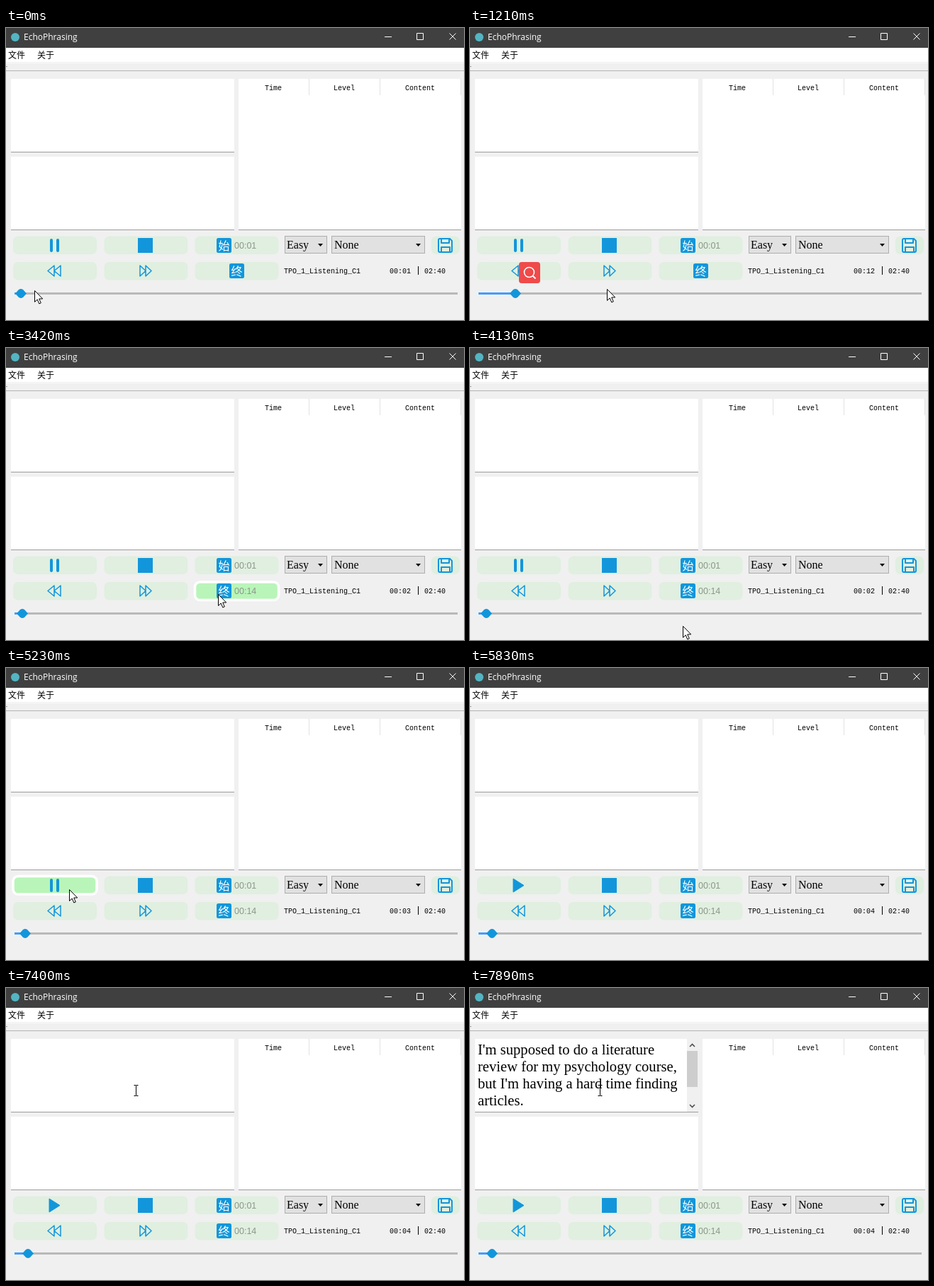
Write an HTML page that moves like this. It is 646 by 413 pixels and loops after 8 s.

```html
<!DOCTYPE html>
<html lang="zh">
<head>
<meta charset="utf-8">
<title>EchoPhrasing</title>
<style>
  html, body { margin: 0; width: 100%; height: 100%; overflow: hidden; background: #f0f0f0; }
  svg { display: block; width: 646px; height: 413px; }
  text { white-space: pre; }
  .title { font: 12px "Open Sans", "Noto Sans", sans-serif; }
  .menu { font: 12px "Noto Sans CJK SC", "Noto Sans CJK", sans-serif; }
  .mono { font: 10px "Liberation Mono", monospace; }
  .combo { font: 16px "Liberation Serif", serif; }
  .script { font: 20.6px "Liberation Serif", serif; }
  .mark { font: 300 16px "Noto Sans CJK SC", "Noto Sans CJK", sans-serif; fill: #fff; text-anchor: middle; }
  .stamp { font: 12.5px "Liberation Sans", sans-serif; fill: #8b978b; }
  .button { fill: #e0efe0; }
  .button.hover { fill: #b9f5b9; stroke: #fff; stroke-width: 3.5; }
  .solid { fill: #1296db; }
  .outline { fill: none; stroke: #1296db; stroke-width: 1.5; stroke-linejoin: round; }
  #bar { fill: #404040; color: #fff; }
  .chrome { fill: none; stroke: #fff; }
  .inactive #bar { fill: #fff; }
  .inactive .chrome { stroke: #858585; }
  .title { fill: #fff; }
  .inactive .title { fill: #999; }
  .inactive .menu { fill: #777; }
</style>
</head>
<body>
<svg id="stage" viewBox="0 0 646 413">
  <rect width="646" height="413" fill="#f0f0f0"/>
  <rect id="bar" width="646" height="28"/>
  <circle cx="13" cy="13" r="6" fill="#52b5c4"/>
  <text class="title" x="25" y="17">EchoPhrasing</text>
  <path class="chrome" d="M534 12.5h10M579.5 7.5h9v9h-9zM625.5 7.5l9 9m0-9l-9 9"/>
  <rect y="28" width="646" height="20" fill="#fff"/>
  <text class="menu" x="3" y="43">文件</text>
  <text class="menu" x="44" y="43">关于</text>
  <path d="M0 49.5h646" stroke="#fafafa"/>
  <path d="M0 60.5h646" stroke="#b4b4b4"/>
  <path d="M0 54.5h2" stroke="#a0a0a0"/>

  <g fill="#fff">
    <rect x="7" y="72" width="315" height="104"/>
    <rect x="7" y="182" width="315" height="104"/>
    <rect x="328" y="72" width="314" height="214"/>
  </g>
  <path d="M7 175.5h315M7 285.5h315M328 285.5h314" stroke="#9c9c9c"/>
  <path d="M427.5 72v23M527.5 72v23M641.5 72v23" stroke="#e2e2e2"/>
  <g class="mono">
    <text x="365" y="88">Time</text>
    <text x="462" y="88">Level</text>
    <text x="563" y="88">Content</text>
    <text x="392" y="347">TPO_1_Listening_C1</text>
    <text id="clock" x="541" y="347"></text>
    <text x="590" y="347">02:40</text>
  </g>
  <path d="M581.5 337v12" stroke="#000"/>

  <g id="transcript">
    <g class="script" id="lines"></g>
    <rect x="306" y="72" width="16" height="103" fill="#f0f0f0"/>
    <rect x="306" y="89" width="15" height="51" fill="#cdcdcd"/>
    <path d="M310 83l3.5-3.5 3.5 3.5M310 165l3.5 3.5 3.5-3.5" fill="none" stroke="#505050" stroke-width="1.6"/>
  </g>

  <g id="buttons"></g>

  <path id="pause" class="solid" d="M64 298h0a2 2 0 0 1 2 2v15a2 2 0 0 1-4 0v-15a2 2 0 0 1 2-2zM73 298h0a2 2 0 0 1 2 2v15a2 2 0 0 1-4 0v-15a2 2 0 0 1 2-2z"/>
  <path id="play" class="solid" d="M61 298L76 307.5 61 317z" stroke="#1296db" stroke-linejoin="round"/>
  <rect class="solid" x="186" y="297" width="21" height="21"/>
  <path class="outline" d="M68 336v15l-9-7.5zM77 336v15l-9-7.5zM189 336v15l8-7.5zM197 336v15l8-7.5z"/>
  <path class="outline" style="stroke-width:2" d="M612 298h14l3 3v14a2 2 0 0 1-2 2h-15a2 2 0 0 1-2-2v-15a2 2 0 0 1 2-2zM614 298v6h11v-6M614 317v-7h12v7"/>

  <g>
    <rect class="solid" x="297" y="297" width="21" height="21" rx="2.5"/>
    <text class="mark" x="307.5" y="313.5">始</text>
    <text class="stamp" x="322" y="312">00:01</text>
  </g>
  <g id="endMark">
    <rect class="solid" x="297" y="333" width="21" height="21" rx="2.5"/>
    <text class="mark" x="307.5" y="349.5">终</text>
  </g>
  <text id="endStamp" class="stamp" x="322" y="348">00:14</text>

  <g fill="#e1e1e1" stroke="#adadad">
    <rect x="393.5" y="294.5" width="59" height="24"/>
    <rect x="459.5" y="294.5" width="131" height="24"/>
  </g>
  <path d="M440 305h7l-3.5 4zM578 305h7l-3.5 4z"/>
  <text class="combo" x="396" y="312">Easy</text>
  <text class="combo" x="463" y="312">None</text>

  <rect x="12" y="374" width="625" height="3" fill="#b9b9b9"/>
  <rect id="played" x="12" y="374" height="3" fill="#409eff"/>
  <path id="handle" class="solid" d="M-8 0L-3-5.5Q0-7.5 3-5.5L8 0 3 5.5Q0 7.5-3 5.5z"/>

  <g id="lookup">
    <rect x="69" y="331" width="30" height="30" rx="4" fill="#f04a4a"/>
    <path d="M88.500 350.500l4 4" stroke="#fff" stroke-width="2"/>
    <circle cx="83.500" cy="345.500" r="7" fill="none" stroke="#fff" stroke-width="1.600"/>
  </g>

  <path id="arrow" d="M.5.5v16l3.700-3.500 2.600 6 2.500-1.100-2.600-5.900h5z" fill="#fff" stroke="#000"/>
  <path id="beam" d="M-3 .5h2.500l.5.500.5-.5h2.500M0 1v14M-3 15.500h2.500l.5-.5.5.5h2.500" transform="translate(183.500 137)" fill="none" stroke="#000"/>
</svg>
<script>
const LOOP = 8000;
const $ = id => document.getElementById(id);

function add(parent, tag, attrs, text = '') {
  const node = document.createElementNS('http://www.w3.org/2000/svg', tag);
  for (const name in attrs) node.setAttribute(name, attrs[name]);
  node.textContent = text;
  parent.append(node);
  return node;
}

const addButton = (x, y, width) =>
  add($('buttons'), 'rect', { class: 'button', x, y, width, height: 25.5, rx: 7 });

const buttons = {};
for (const [row, y] of [[0, 294.5], [1, 331]])
  [10, 138.5, 266.5].forEach((x, col) => buttons[`${row}${col}`] = addButton(x, y, 118));
addButton(600, 294.5, 40);

["I'm supposed to do a literature", 'review for my psychology course,',
 "but I'm having a hard time finding", 'articles.']
  .forEach((line, i) => add($('lines'), 'text', { x: 11, y: 94 + 24 * i }, line));

// Each row: start time in ms, then the values held from then on.
const pointer = [
  [0, 'arrow', 40, 371], [120, 'arrow', 24, 373], [730, 'arrow', 28, 375],
  [850, 'arrow', 44, 376], [970, 'arrow', 64, 375], [1090, 'arrow', 104, 374],
  [1210, 'arrow', 193, 369], [1330, 'arrow', 276, 355], [1450, 'arrow', 298, 351],
  [1570, 'arrow', 299, 349], [1690, 'arrow', 299, 348], [4130, 'arrow', 300, 393],
  [4250, 'arrow', 301, 406], [4370, ''], [4990, 'arrow', 118, 396],
  [5110, 'arrow', 98, 338], [5230, 'arrow', 89, 313], [5470, 'arrow', 150, 320],
  [5590, 'arrow', 400, 344], [5710, 'arrow', 576, 359], [5830, ''],
  [7040, 'beam', 212, 250], [7160, 'beam', 200, 210],
  [7280, 'beam', 186, 150], [7400, 'beam', 183, 137]
];
const position = [
  [0, 1, 21], [490, 2, 25], [730, 3, 29], [850, 7, 45], [970, 12, 64],
  [1450, 13, 66], [2430, 14, 70], [2670, 1, 21], [3420, 2, 23],
  [4370, 3, 27], [5350, 4, 31]
];
const hovered = [[0, ''], [1450, '12'], [4130, ''], [5230, '00'], [5470, '']];

const at = (track, t) => track.findLast(row => row[0] <= t).slice(1);
const show = (id, visible) => $(id).style.display = visible ? '' : 'none';
const place = (id, x, y) => $(id).setAttribute('transform', `translate(${x} ${y})`);

function draw(t) {
  const [seconds, x] = at(position, t);
  $('clock').textContent = '00:' + String(seconds).padStart(2, '0');
  $('played').setAttribute('width', x - 12);
  place('handle', x, 375.5);

  const [kind, px, py] = at(pointer, t);
  for (const id of ['arrow', 'beam']) show(id, id === kind);
  if (kind) place(kind, px + (kind === 'beam' ? 0.5 : 0), py);

  const [hover] = at(hovered, t);
  for (const key in buttons) buttons[key].classList.toggle('hover', key === hover);

  const marked = t >= 2550;
  place('endMark', marked ? 0 : 18, 0);
  show('endStamp', marked);
  show('pause', t < 5350);
  show('play', t >= 5350);
  show('lookup', t >= 1090 && t < 1940);
  show('transcript', t >= 7770);
  $('stage').classList.toggle('inactive', t >= 6450 && t < 7040);
}

const start = performance.now();
function tick() {
  draw((performance.now() - start) % LOOP);
  requestAnimationFrame(tick);
}
tick();
</script>
</body>
</html>
```
